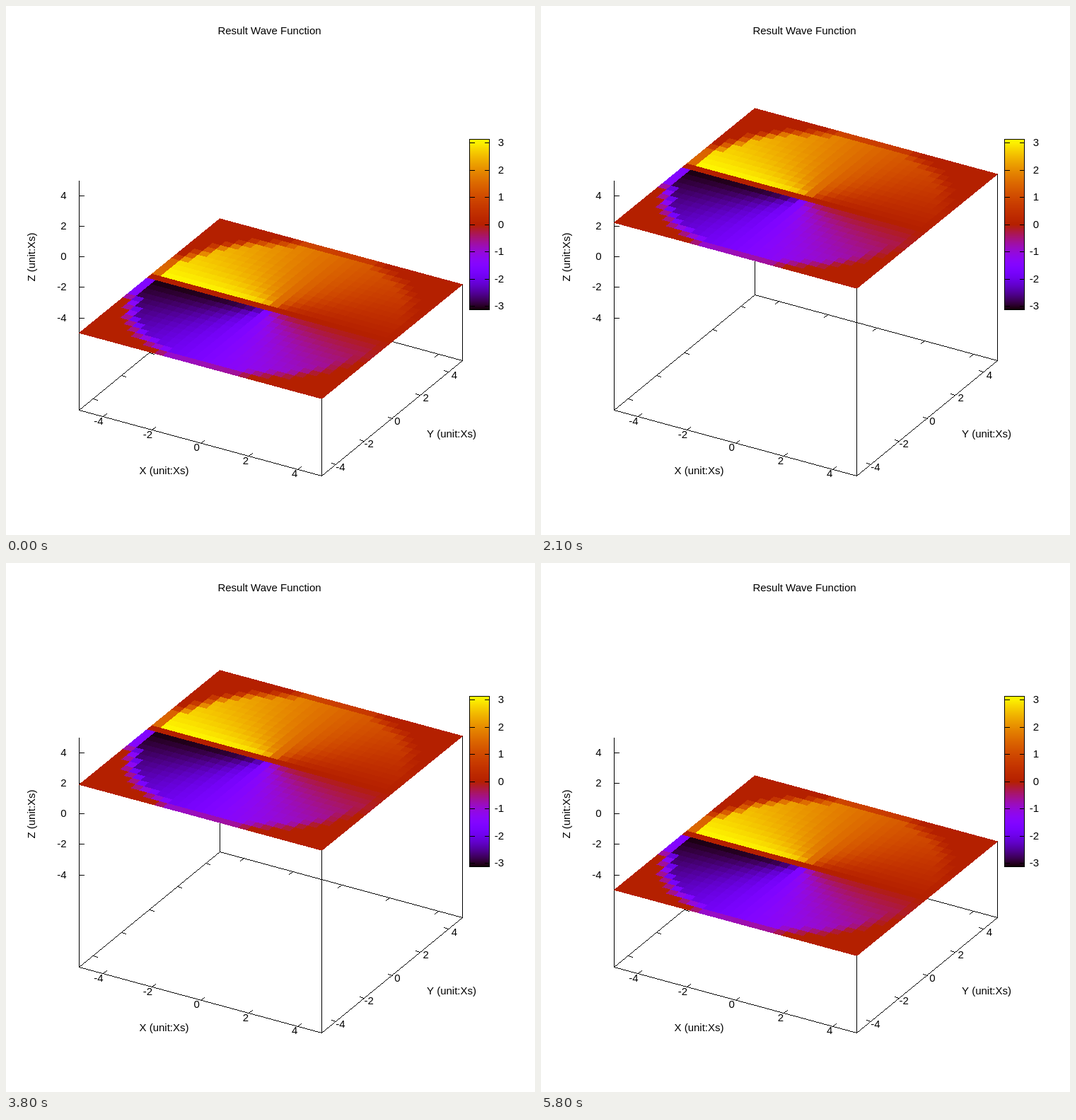
Recreate the animation shown at these times as an HTML page with a canvas. Size 748 by 748 pixels, loop 5.9 s.

```html
<!DOCTYPE html>
<html lang="en">
<head>
<meta charset="utf-8">
<title>Result Wave Function</title>
<style>
html, body { margin: 0; width: 100%; height: 100%; overflow: hidden; background: #fff; }
canvas { display: block; }
</style>
</head>
<body>
<canvas id="stage" width="748" height="748"></canvas>
<script>
const SIZE = 748, CELLS = 29, STEP_MS = 100, STEPS = 2 * CELLS + 1, RISE = 216 / CELLS;
const LEFT = [103, 571], FRONT = [446, 664], RIGHT = [645, 501], BACK = [302, 408];
const TICKS = [-4, -2, 0, 2, 4];

function makeLayer() {
  const canvas = document.createElement('canvas');
  canvas.width = canvas.height = SIZE;
  return canvas;
}

// Black-violet-red-yellow palette over the phase range -PI..PI
function palette(phase) {
  const g = Math.min(1, Math.max(0, phase / (2 * Math.PI) + 0.5));
  return [Math.sqrt(g), g ** 3, Math.max(0, Math.sin(2 * Math.PI * g))].map(c => Math.round(255 * c));
}

// Phase angle at a grid point, zero outside the disc
function phaseAt(i, j) {
  const x = -5 + 10 * i / CELLS, y = -5 + 10 * j / CELLS;
  return Math.hypot(x, y) < 5 ? Math.atan2(y, x) : 0;
}

function cellColor(i, j) {
  return palette((phaseAt(i, j) + phaseAt(i + 1, j) + phaseAt(i, j + 1) + phaseAt(i + 1, j + 1)) / 4);
}

// The sheet at its lowest position, rasterised without smoothing
function makeSheet() {
  const canvas = makeLayer(), ctx = canvas.getContext('2d');
  const image = ctx.createImageData(SIZE, SIZE);
  const ax = 343, ay = 93, bx = 199, by = 161.7, det = ax * by + bx * ay, slack = 0.0015;
  const cell = f => Math.min(CELLS - 1, Math.max(0, Math.floor(f * CELLS)));
  for (let y = 300; y < 555; y++) {
    for (let x = 103; x < 646; x++) {
      const px = x - 103, py = y - 461.9;
      const u = (by * px + bx * py) / det, v = (ay * px - ax * py) / det;
      if (Math.min(u, v) < -slack || Math.max(u, v) > 1 + slack) continue;
      image.data.set([...cellColor(cell(u), cell(v)), 255], 4 * (y * SIZE + x));
    }
  }
  ctx.putImageData(image, 0, 0);
  return canvas;
}

// One-pixel line without smoothing
function line(ctx, [x0, y0], [x1, y1]) {
  const n = Math.max(1, Math.round(Math.max(Math.abs(x1 - x0), Math.abs(y1 - y0))));
  for (let i = 0; i <= n; i++) {
    ctx.fillRect(Math.round(x0 + (x1 - x0) * i / n), Math.round(y0 + (y1 - y0) * i / n), 1, 1);
  }
}

function tick(ctx, from, to, value, dx, dy) {
  const f = (value + 5) / 10;
  const p = [0, 1].map(k => Math.round(from[k] + (to[k] - from[k]) * f));
  line(ctx, p, [p[0] + dx, p[1] + dy]);
}

function drawColorBar(ctx) {
  for (let y = 188; y < 430; y++) {
    ctx.fillStyle = `rgb(${palette((308.7 - y) / 38.4)})`;
    ctx.fillRect(656, y, 27, 1);
  }
  ctx.fillStyle = '#000';
  const corners = [[655, 188], [683, 188], [683, 429], [655, 429]];
  corners.forEach((p, i) => line(ctx, p, corners[(i + 1) % 4]));
  ctx.textAlign = 'right';
  for (let v = -3; v <= 3; v++) {
    const y = Math.round(308.7 - 38.5 * v);
    line(ctx, [656, y], [662, y]);
    line(ctx, [677, y], [683, y]);
    ctx.fillText(v, 704, y + 5);
  }
}

// Everything that stays still
function makeBackdrop() {
  const canvas = makeLayer(), ctx = canvas.getContext('2d');
  ctx.fillStyle = '#fff';
  ctx.fillRect(0, 0, SIZE, SIZE);
  ctx.font = '15px "Liberation Sans", Arial, sans-serif';
  drawColorBar(ctx);

  [LEFT, FRONT, RIGHT, BACK].forEach((p, i, all) => line(ctx, p, all[(i + 1) % 4]));
  line(ctx, [103, 247], LEFT);

  TICKS.forEach((v, i) => {
    tick(ctx, LEFT, FRONT, v, 5, -4);
    tick(ctx, BACK, RIGHT, v, -5, 4);
    tick(ctx, FRONT, RIGHT, v, -6, -2);
    tick(ctx, LEFT, BACK, v, 6, 2);
    const z = Math.round(354.3 - 21.55 * v);
    line(ctx, [103, z], [110, z]);
    ctx.textAlign = 'right';
    ctx.fillText(v, 85.5, z + 5);
    ctx.textAlign = 'center';
    ctx.fillText(v, 131 + 69.3 * i, 592 + 18.5 * i);
    ctx.fillText(v, 473 + 40.2 * i, 656.5 - 32.5 * i);
  });

  ctx.fillText('Result Wave Function', 372.5, 40);
  ctx.fillText('X (unit:Xs)', 223.5, 662);
  ctx.fillText('Y (unit:Xs)', 630, 610);
  ctx.translate(41, 355);
  ctx.rotate(-Math.PI / 2);
  ctx.fillText('Z (unit:Xs)', 0, 0);
  return canvas;
}

const stage = document.getElementById('stage').getContext('2d');
const backdrop = makeBackdrop(), sheet = makeSheet();

function draw(now) {
  const step = Math.floor(now / STEP_MS) % STEPS;
  const level = CELLS - Math.abs(CELLS - step);
  const shift = Math.round(300.35 - RISE * level) - 300;
  stage.drawImage(backdrop, 0, 0);
  stage.fillStyle = '#000';
  line(stage, [FRONT[0], 554 + shift], FRONT);
  line(stage, [RIGHT[0], 393 + shift], RIGHT);
  line(stage, [BACK[0], 301 + shift], BACK);
  stage.drawImage(sheet, 0, shift);
}

const start = performance.now();
function loop() {
  draw(performance.now() - start);
  requestAnimationFrame(loop);
}
loop();
</script>
</body>
</html>
```
